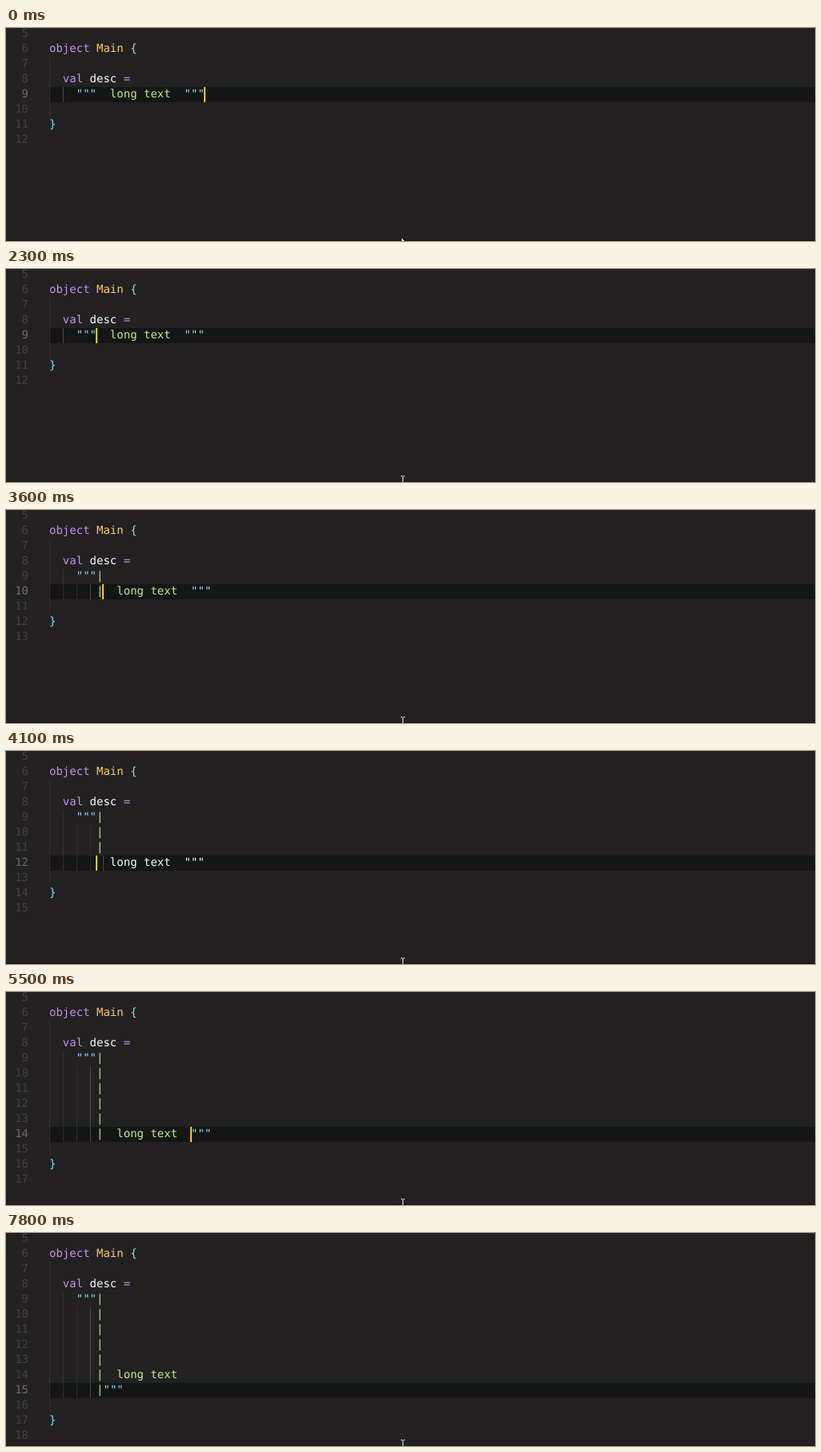
Animation, 1010 px wide and 267 px high, one loop 8 s. Source, as an HTML page:

```html
<!DOCTYPE html>
<html lang="en">
<head>
<meta charset="utf-8">
<title>Multiline string editing</title>
<style>
html, body { margin: 0; width: 100%; height: 100%; overflow: hidden; background: #222021; }
#stage { position: relative; width: 1010px; height: 267px; overflow: hidden;
  font: 14px/19px "DejaVu Sans Mono", monospace; text-rendering: geometricPrecision; color: #eeffff; }
#stage div { position: absolute; white-space: pre; }
.num { left: 0; width: 28px; text-align: right; color: #424142; }
.num.on { color: #6b6b6b; }
.code { left: 54px; }
.k { color: #c792ea; }
.t { color: #ffcb6b; }
.p { color: #89ddff; }
.s { color: #c3e88d; }
</style>
</head>
<body>
<div id="stage"></div>
<script>
const LOOP = 8000, TICK = 100, BLINK = 500;
const CHAR = 8.428, LEFT = 54, ROW = 19, FIRST = 5;

const ENTERS = [3500, 4000, 4100, 4300, 4400, 6300];
const BARS = [2700, 3600, 4600, 6400];
const move = (start, end, from, to) => ({ start, end, from, to });
const stay = (time, column) => move(time, time, column, column);
const CARET = [
  stay(0, 23), move(1000, 1300, 22, 11), move(1500, 1900, 9, 7), stay(4700, 9),
  move(5200, 5500, 10, 21), move(5900, 6000, 19, 21), move(6800, 7100, 9, 11), stay(7300, 11),
  ...ENTERS.map(t => stay(t, 7)), ...BARS.map(t => stay(t, 8))
].sort((a, b) => a.start - b.start);

const stage = document.getElementById("stage");
const span = (cls, text) => `<span class="${cls}">${text}</span>`;
const rowTop = line => (line - FIRST) * ROW - 2;
const box = (x, y, w, h, color) =>
  `<div style="left:${x}px;top:${y}px;width:${w}px;height:${h}px;background:${color}"></div>`;
const quoted = text => text.split(/(""")/).map(s => span(s === '"""' ? "p" : "s", s)).join("");
const past = (times, t) => times.filter(at => at <= t);

// Caret column, or -1 while it is blinked off.
function caretAt(t) {
  const { start, end, from, to } = CARET.filter(m => m.start <= t).pop();
  if (t >= end + BLINK) return -1;
  const done = t >= end ? 1 : (t - start) / (end - start);
  return Math.round(from + (to - from) * done);
}

// Each line is { indent, html }, starting at line FIRST.
function buildLines(breaks, bar) {
  const line = (indent, html = "") => ({ indent, html: " ".repeat(indent) + html });
  const tail = '  long text  """';
  const lines = [
    line(0),
    line(0, span("k", "object") + " " + span("t", "Main") + " " + span("p", "{")),
    line(2),
    line(2, span("k", "val") + " desc " + span("k", "="))
  ];
  if (!breaks) {
    lines.push(line(4, quoted('"""' + (bar ? "|" : "") + tail)));
  } else {
    lines.push(line(4, quoted('"""|')));
    for (let i = 1; i < breaks; i++)
      lines.push(line(7, quoted(i === 5 ? "|  long text" : "|")));
    const rest = breaks === 6 ? '"""' : tail;
    if (bar) lines.push(line(7, quoted("|" + rest)));
    else lines.push(line(rest === tail ? 9 : 7, rest.trimStart()));
  }
  return [...lines, line(2), line(0, span("p", "}")), line(0)];
}

// Indent guides; the deepest one around the current line is brighter.
function guides(lines, current) {
  const column = 2 * Math.ceil(lines[current].indent / 2) - 2;
  let from = current, to = current;
  while (lines[from - 1].indent > column) from--;
  while (lines[to + 1].indent > column) to++;
  let html = "";
  lines.forEach(({ indent }, i) => {
    for (let c = 0; c < indent; c += 2) {
      const active = c === column && i >= from && i <= to;
      html += box(Math.round(LEFT + c * CHAR), rowTop(FIRST + i), 1, ROW, active ? "#484748" : "#302e2f");
    }
  });
  return html;
}

function pointer(beam) {
  return beam
    ? box(493, 259, 2, 1, "#ddd") + box(496, 259, 2, 1, "#ddd") + box(495, 260, 1, 7, "#eee")
    : box(494, 264, 1, 3, "#eee") + box(495, 265, 1, 2, "#eee") + box(496, 266, 1, 1, "#eee");
}

function draw(t) {
  const enters = past(ENTERS, t), breaks = enters.length;
  const bar = past(BARS, t).some(at => at > (enters[breaks - 1] || 0));
  const lines = buildLines(breaks, bar), current = 4 + breaks;
  const y = rowTop(FIRST + current), caret = caretAt(t);
  let html = box(LEFT, y, 1010 - LEFT, ROW, "#141615") + guides(lines, current);
  lines.forEach((line, i) => {
    const style = `style="top:${rowTop(FIRST + i)}px"`;
    html += `<div class="num${i === current ? " on" : ""}" ${style}>${FIRST + i}</div>` +
      `<div class="code" ${style}>${line.html}</div>`;
  });
  if (caret >= 0) html += box(Math.round(LEFT - 1 + caret * CHAR), y, 2, ROW, "#ffcc00");
  stage.innerHTML = html + box(0, 266, 1010, 1, "#151415") + pointer(t >= 500);
}

let shown;
function frame() {
  const t = Math.floor(performance.now() % LOOP / TICK) * TICK;
  if (t !== shown) draw(shown = t);
  requestAnimationFrame(frame);
}
frame();
</script>
</body>
</html>
```
